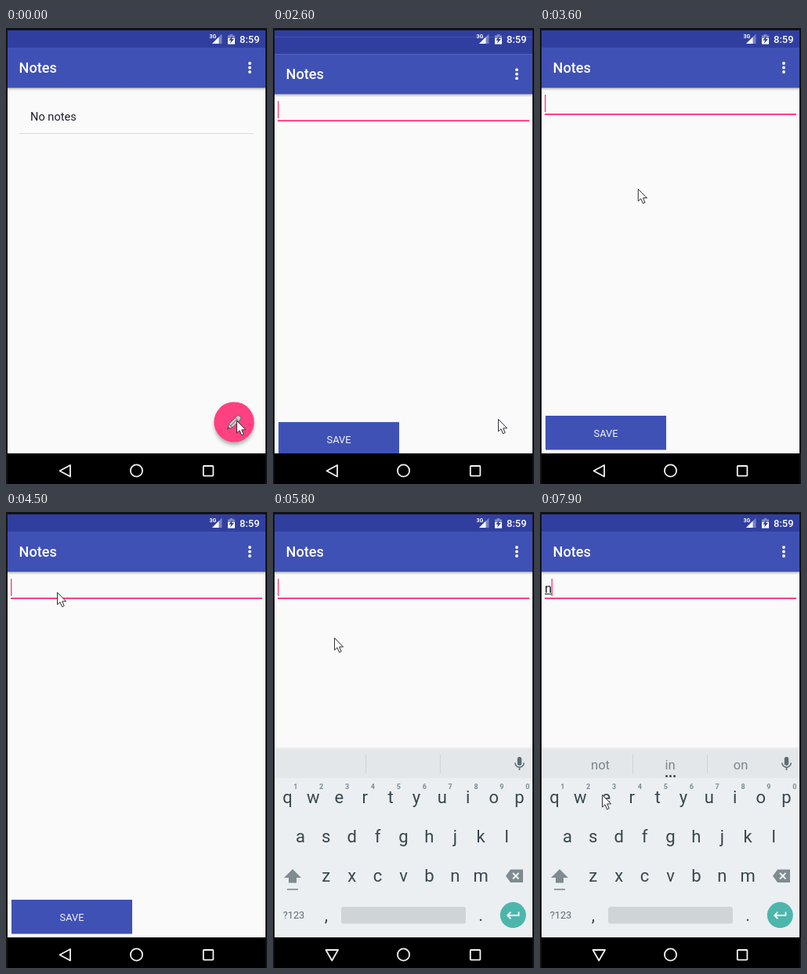
Write an HTML page that moves like this. It is 333 px wide and 581 px high and loops after 8 s.

```html
<!DOCTYPE html>
<html lang="en">
<head>
<meta charset="utf-8">
<title>Notes</title>
<style>
  html, body { margin: 0; height: 100%; overflow: hidden; background: #121214; }
  svg { display: block; width: 100vw; height: 100vh; font-family: Roboto, sans-serif; }
  .mid { text-anchor: middle; }
  .key { font-size: 22px; fill: #37474f; text-anchor: middle; }
  .hint { font-size: 9px; font-weight: 700; fill: #7d8c93; text-anchor: middle; }
  .word { font-size: 16.5px; fill: #7b868b; text-anchor: middle; }
  .line { fill: none; stroke: #f2f2f2; stroke-width: 1.8; stroke-linejoin: round; }
</style>
</head>
<body>
<svg viewBox="0 0 333 581">
  <defs>
    <clipPath id="screen"><rect x="2" y="3" width="329" height="539"/></clipPath>
    <linearGradient id="fade" x2="0" y2="1">
      <stop stop-color="#000" stop-opacity=".25"/>
      <stop offset="1" stop-color="#000" stop-opacity="0"/>
    </linearGradient>
    <filter id="soft" x="-50%" y="-50%" width="200%" height="200%"><feGaussianBlur stdDeviation="2.6"/></filter>
    <g id="base">
      <rect x="2" y="3" width="329" height="539" fill="#fafafa"/>
      <rect x="2" y="76" width="329" height="4" fill="url(#fade)"/>
      <rect x="2" y="3" width="329" height="22" fill="#303f9f"/>
      <rect x="2" y="25" width="329" height="51.2" fill="#3f51b5"/>
      <text x="16.6" y="57" font-size="18.1" font-weight="500" fill="#fff">Notes</text>
      <g fill="#fff">
        <circle cx="311" cy="45" r="1.9"/><circle cx="311" cy="50.5" r="1.9"/><circle cx="311" cy="56" r="1.9"/>
      </g>
    </g>
  </defs>

  <rect width="333" height="581" fill="#121214"/>
  <rect x="2" y="542" width="329" height="39"/>

  <g clip-path="url(#screen)">
    <g id="list">
      <use href="#base"/>
      <text x="31" y="118" font-size="14.6" fill="#211b2d">No notes</text>
      <rect x="17" y="134" width="299" height="1" fill="#dcdcdc"/>
      <circle cx="291" cy="506" r="25" opacity=".33" filter="url(#soft)"/>
      <circle cx="291" cy="502" r="25.6" fill="#ff4081"/>
      <circle id="ripple" cx="291" cy="502" r="0" fill="#fff" opacity=".25"/>
      <g transform="translate(282.5 511) rotate(-45)" stroke="#6d5560" stroke-width=".9" stroke-linejoin="round">
        <path d="M0 0L6-3.2H20Q23-3.2 23 0T20 3.2H6Z" fill="#d3c3ca"/>
        <path d="M6-3.2V3.2M17-3.2V3.2M6 0H17" fill="none"/>
        <path d="M0 0L2.6-1.4V1.4Z" fill="#4b3a42"/>
      </g>
    </g>

    <g id="editor">
      <use href="#base"/>
      <rect x="6" y="109" width="321" height="2" fill="#ff4081"/>
      <g id="typed">
        <text x="6" y="102.5" font-size="16.5" fill="#212121">n</text>
        <rect x="6" y="104" width="9" height="1" fill="#212121"/>
      </g>
      <rect id="caret" y="85" width="1.4" height="22" fill="#ff4081"/>
      <rect x="7" y="494" width="154" height="43.5" fill="#3f51b5"/>
      <text class="mid" x="84" y="521" font-size="12.8" fill="#f2f2f7">SAVE</text>
    </g>

    <g id="keyboard">
      <rect x="2" y="300" width="329" height="2" fill="#000" opacity=".06"/>
      <rect x="2" y="302" width="329" height="242" fill="#eceff1"/>
      <rect x="2" y="302" width="329" height="37" fill="#e3e7e9"/>
      <path d="M118.5 309V333M213.5 309V333" stroke="#cdd3d6"/>
      <g id="words">
        <text class="word" x="77" y="328">not</text>
        <text class="word" x="166" y="328">in</text>
        <text class="word" x="256" y="328">on</text>
        <g fill="#37474f">
          <circle cx="161.5" cy="336.5" r="1.5"/><circle cx="166.5" cy="336.5" r="1.5"/><circle cx="171.5" cy="336.5" r="1.5"/>
        </g>
      </g>
      <rect x="311.8" y="312" width="5.4" height="11" rx="2.7" fill="#5b6c74"/>
      <path d="M308.8 319.5a5.7 5.7 0 0 0 11.4 0M314.5 325.5V329" fill="none" stroke="#5b6c74" stroke-width="1.6"/>
      <g id="keys"></g>
      <path d="M25 455L36 466H30V472.5H20V466H14Z" fill="#7e8b91"/>
      <rect x="18" y="480" width="14" height="1.6" fill="#7e8b91"/>
      <path d="M303 455.5H319V472H303L297 463.7Z" fill="#7e8b91"/>
      <path d="M306 460L313.5 467.5M313.5 460L306 467.5" stroke="#f4f6f7" stroke-width="1.8"/>
      <text class="mid" x="26.5" y="518" font-size="12.8" fill="#5b6c74">?123</text>
      <rect x="87" y="503" width="159" height="21.5" rx="3" fill="#cfd4d6"/>
      <circle cx="306.3" cy="513.6" r="16.5" fill="#4db6ac"/>
      <path d="M313.5 509.5V514H299.5M303.5 509.7L299.2 514L303.5 518.3" fill="none" stroke="#f4fbfa" stroke-width="1.8"/>
    </g>
  </g>

  <g fill="#fff">
    <text x="259.5" y="12.6" font-size="7" font-weight="700">3G</text>
    <path d="M263 20L275.5 7.5V20Z" opacity=".35"/>
    <path d="M263 20L271.5 11.5V20Z"/>
    <path d="M283 9.5H285.7V8H289.3V9.5H292V20.5H283Z" opacity=".4"/>
    <path d="M283 13H292V20.5H283Z"/>
    <path d="M289 10L284.3 15.7H287L286 19.8L291 14H288.2Z" fill="#303f9f"/>
    <text x="298" y="19" font-size="13" font-weight="500">8:59</text>
  </g>

  <path id="back" class="line"/>
  <circle class="line" cx="166.5" cy="564" r="7.6"/>
  <rect class="line" x="251.8" y="558" width="12.6" height="12.6" rx=".8"/>

  <path id="pointer" d="M.5.5V16L4 12.8L6.500 18.8L9.2 17.7L6.7 11.9H11.6Z" fill="#fdfdfd" stroke="#303036" stroke-linejoin="round"/>
</svg>
<script>
const $ = id => document.getElementById(id);
const clamp = v => Math.min(1, Math.max(0, v));
const show = (id, on) => $(id).setAttribute('visibility', on ? 'visible' : 'hidden');
const move = (id, x, y) => $(id).setAttribute('transform', `translate(${x} ${y})`);

// Ten equal key columns; each row starts at a column offset.
const KEY_STEP = 32.9;
const column = i => 2 + (i + 0.5) * KEY_STEP;
const rows = [['qwertyuiop', 0, 371], ['asdfghjkl', 0.5, 421], ['zxcvbnm', 1.5, 471]];
const label = (cls, x, y, s) => `<text class="${cls}" x="${x}" y="${y}">${s}</text>`;
$('keys').innerHTML =
  rows.map(([chars, start, y]) => [...chars].map((c, i) => label('key', column(start + i), y, c)).join('')).join('') +
  [...'1234567890'].map((c, i) => label('hint', column(i) + 10.3, 353, c)).join('') +
  label('key', column(1.5), 521, ',') + label('key', column(7.5), 521, '.');

// Pointer stops: time, x, y
const stops = [
  [0, 294, 500], [500, 294, 500], [800, 289, 498], [900, 289, 498],
  [1200, 282, 498], [1300, 282, 498], [1500, 283, 502], [1600, 286, 501],
  [1700, 287, 499], [1800, 287, 499], [1900, 287, 498], [3000, 287, 498],
  [3900, 68, 102], [4100, 66, 102], [4300, 66, 102], [4500, 65, 102],
  [5700, 65, 102], [5800, 78, 160], [6600, 78, 438], [6900, 205, 484],
  [7300, 229, 467], [7500, 229, 467], [7900, 79, 360], [8000, 79, 360]
];

function pointerAt(t) {
  const i = stops.findIndex(s => s[0] > t);
  const [t0, x0, y0] = stops[i - 1], [t1, x1, y1] = stops[i];
  const p = (t - t0) / (t1 - t0);
  const e = t1 - t0 > 500 ? p * p * (3 - 2 * p) : p;
  return [x0 + (x1 - x0) * e, y0 + (y1 - y0) * e];
}

const caretOn = t => t < 3050 || t >= 7298 || Math.floor((t - 3050) / 472) % 2 === 1;

function draw(t) {
  const press = clamp((t - 2200) / 300);
  $('ripple').setAttribute('r', 25.6 * press);

  const enter = clamp((t - 2300) / 600);
  move('editor', 0, 46 * (1 - enter) ** 2.5);
  $('editor').setAttribute('opacity', clamp((t - 2300) / 300));
  show('editor', t >= 2400);

  const typed = t >= 7500;
  show('typed', typed);
  show('words', t >= 7600);
  show('caret', t >= 2400 && caretOn(t));
  $('caret').setAttribute('x', typed ? 14.6 : 6);

  const rise = clamp((t - 5100) / 400);
  show('keyboard', rise > 0);
  move('keyboard', 0, 241 * (1 - rise) ** 2);

  $('back').setAttribute('d', t < 4800 ? 'M68.5 564.2L82 557V571.5Z' : 'M67.5 558H83L75.2 571.5Z');
  move('pointer', ...pointerAt(t));
}

// The screen refreshes ten times a second.
function tick() {
  draw(Math.floor(performance.now() % 8000 / 100) * 100);
  requestAnimationFrame(tick);
}
tick();
</script>
</body>
</html>
```
